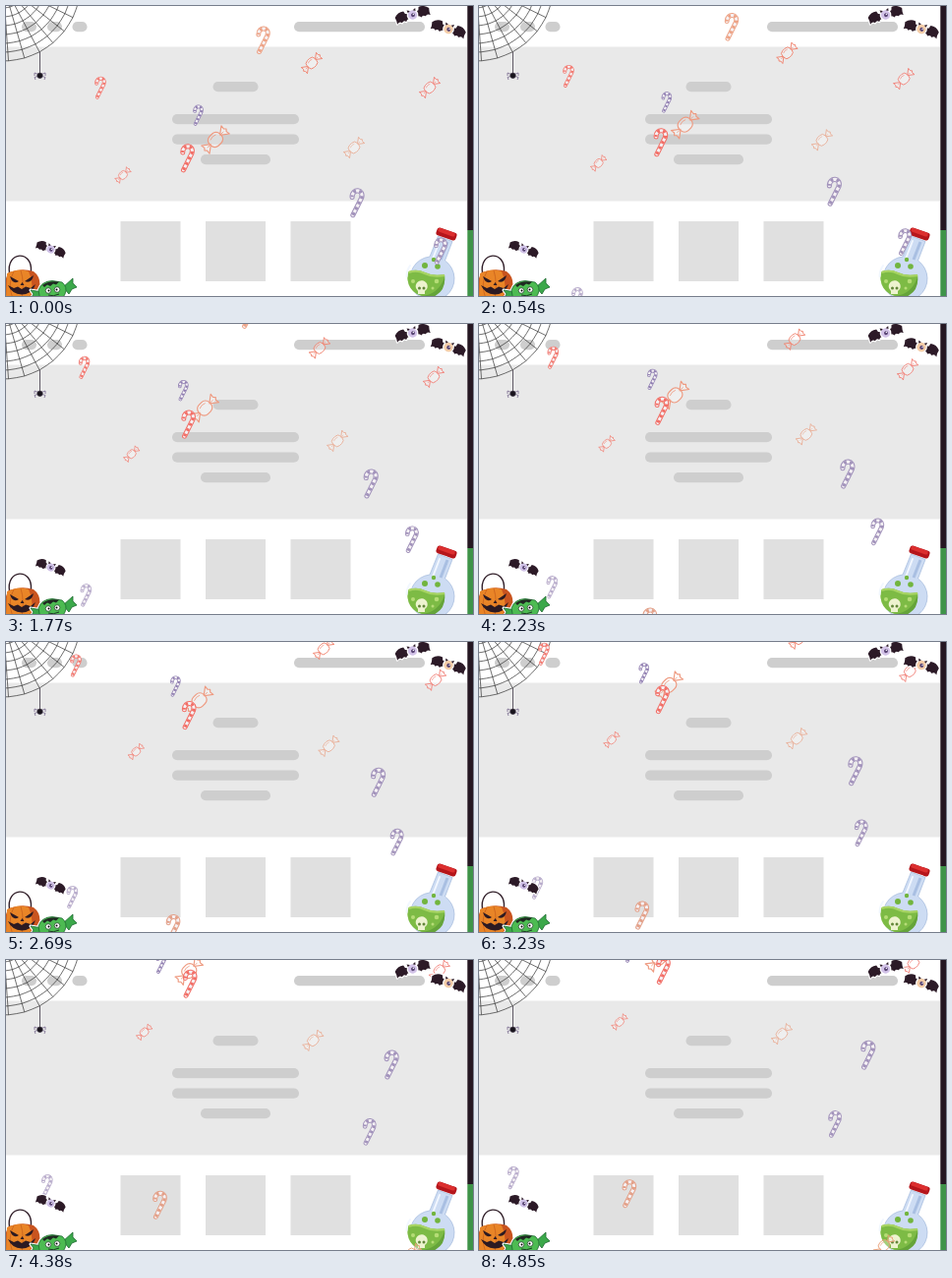
These frames come from a looping animation (475 by 295 pixels, 4920 ms). An HTML page:

```html
<!DOCTYPE html>
<html lang="en">
<head>
<meta charset="utf-8">
<title>Halloween page</title>
<style>
  html, body { margin: 0; width: 100%; height: 100%; overflow: hidden; background: #fff; }
  svg { display: block; width: 475px; height: 295px; }
</style>
</head>
<body>
<svg viewBox="0 0 475 295">
  <defs>
    <path id="hook" d="M-4 12.3L4.4-4.5C7.5-13.5-5-14.5-4.8-5.5" fill="none"/>
    <g id="cane" stroke-linecap="round">
      <use href="#hook" stroke="currentColor" stroke-width="5"/>
      <use href="#hook" stroke="#f5f1f4" stroke-width="3"/>
      <use href="#hook" stroke="currentColor" stroke-width="3.2" stroke-dasharray="2.8 3.2" stroke-linecap="butt"/>
    </g>
    <g id="candy" transform="rotate(-45)" fill="#fff" fill-opacity=".3" stroke="currentColor" stroke-width=".9" stroke-linejoin="round">
      <path d="M5 0L11-4.5L10.6-1.5L12 0L10.6 1.5L11 4.5ZM-5 0L-11-4.5L-10.6-1.5L-12 0L-10.6 1.5L-11 4.5Z"/>
      <rect x="-5.7" y="-5" width="11.4" height="10" rx="4.2"/>
      <path d="M-3-2.500Q0-4 3-2.500M6 0H9M-6 0H-9" fill="none" stroke-width=".6"/>
    </g>
    <path id="wing" d="M3-1Q5-3 7-3L8-6Q14-7 18-2Q17 1 17.500 5Q14.500 2.500 12.500 5Q10 2.500 8 5Q6 2 3 3Z"/>
    <g id="bat">
      <g fill="#2c1a27" stroke="#fff" stroke-width="2.400" paint-order="stroke" stroke-linejoin="round">
        <use href="#wing"/>
        <use href="#wing" transform="scale(-1 1)"/>
        <circle r="4.700" fill="currentColor"/>
      </g>
      <path d="M-4-3L-4.500-6L-1.500-4.500M4-3L4.500-6L1.500-4.500" fill="#2c1a27"/>
      <circle r="2" cx=".4" cy=".3" fill="#5a4675"/>
      <circle r=".7" cx="1" cy="-.4" fill="#fff"/>
    </g>
  </defs>

  <path d="M0 41.400H469V198.600H0Z" fill="#e9e9e9"/>
  <g id="pills" fill="#cecece"></g>
  <path d="M116.500 219h61v61h-61zM203 219h61v61h-61zM289.500 219h61v61h-61z" fill="#e0e0e0"/>
  <path d="M469.300 0h5.700v228h-5.700z" fill="#251722"/>
  <path d="M469.300 228h5.700v67h-5.700z" fill="#3f9449"/>

  <path id="web" fill="none" stroke="#333" stroke-width=".7"/>
  <g stroke="#3b3442" stroke-width=".8" fill="none">
    <path d="M34.500 47V68"/>
    <path d="M34 70L29 68V71M34 71L29 72.500L30 75M35 70L40 68V71M35 71L40 72.500L39 75" stroke="#77698d"/>
    <circle cx="34.500" cy="70.800" r="2.700" fill="#17131b"/>
  </g>

  <g id="flask">
    <path d="M439.500 234L454 239.500L446.500 259A22.500 22.500 0 1 1 431 255Z" fill="#cddcf3" stroke="#a9bedf" stroke-width=".8"/>
    <path d="M409.500 270Q418 267 426 271T446 273A19 19 0 1 1 409.500 270Z" fill="#7dbb45"/>
    <path d="M446 276A19 19 0 0 1 418 295Q439 296 446 276Z" fill="#65a43a"/>
    <path d="M409.500 271Q418 268 426 272T446 274" fill="none" stroke="#a9d565" stroke-width="2"/>
    <path d="M441 239L434.500 256M411 264Q407.500 269 407.500 275" fill="none" stroke="#f2f7ff" stroke-width="2" stroke-linecap="round"/>
    <path d="M449 240L442 258" stroke="#a9bfe2" stroke-width="3"/>
    <g transform="translate(448 232) rotate(19)">
      <rect x="-10.500" y="-4" width="21" height="8" rx="2.500" fill="#b5151b"/>
      <rect x="-9.500" y="-3.700" width="18" height="4" rx="2" fill="#dc2f2f"/>
    </g>
    <g fill="#72b53e">
      <circle cx="426" cy="264" r="3"/><circle cx="435" cy="258" r="2.200"/><circle cx="439" cy="265" r="2.800"/>
    </g>
    <g fill="#b5dc76">
      <circle cx="414" cy="280" r="2"/><circle cx="438" cy="280" r="2.300"/><circle cx="434" cy="287" r="1.500"/>
    </g>
    <path d="M417 287A6 6 0 1 1 428 288L426 290V293H419V290Z" fill="#edf3cf"/>
    <g fill="#63863a"><circle cx="420.500" cy="287" r="1.500"/><circle cx="425" cy="287" r="1.500"/></g>
  </g>

  <g id="sweets"></g>

  <use href="#bat" transform="translate(413.500 9) rotate(-16)" color="#d3c3e8"/>
  <use href="#bat" transform="translate(450 23.500) rotate(17)" color="#f4cda8"/>
  <use href="#bat" transform="translate(45.500 247.500) rotate(20) scale(.86)" color="#cfc1e6"/>

  <g id="pumpkin">
    <path d="M3.500 272C0 249 27 248 25.500 270" fill="none" stroke="#33212b" stroke-width="1.400"/>
    <path d="M3 271Q16 266 28 270Q36 276 34 287Q32 295 27 299H2Q-5 283 3 271Z" fill="#c9541f"/>
    <path d="M1 272Q14 266 23 270Q30 284 23 299H0Z" fill="#e98527"/>
    <path d="M8 270Q1 282 7 298M15 269Q19 282 16 298" fill="none" stroke="#cf681f"/>
    <path d="M4 275L13 280Q7 284 4 275ZM28 274L19 280Q26 283 28 274ZM16.500 281L14.500 284H18.500ZM2 284L8 287L12 285.500L16 288L20 285.500L25 287L30 283Q27 293 16 293.500Q6 293 2 284Z" fill="#2c1a22"/>
  </g>

  <g id="monster" stroke-linejoin="round">
    <path d="M58 286L68 277L68 282L72 286L67 288L64 293ZM37 291L25 289L28 293L25 298H36ZM33 289Q36 280 47 279.500L57 281Q63 286 60 293L56 300H35Z" fill="#fff" stroke="#fff" stroke-width="3"/>
    <path d="M58 286L68 277L68 282L72 286L67 288L64 293ZM37 291L25 289L28 293L25 298H36Z" fill="#3ba84a" stroke="#1d6a30" stroke-width=".8"/>
    <path d="M33 289Q36 280 47 279.500L57 281Q63 286 60 293L56 300H35Z" fill="#4dbb52" stroke="#1d6a30" stroke-width=".8"/>
    <path d="M37 284Q43 279 54 280.500L51 283.500L48 282.500L45 285L42 283.500L39 286Z" fill="#1f2822"/>
    <g fill="#fff" stroke="#1d3a24" stroke-width=".7">
      <circle cx="43" cy="289.500" r="2.800"/><circle cx="52" cy="288.500" r="2.800"/>
    </g>
    <circle cx="43.500" cy="289.500" r="1"/><circle cx="51.500" cy="288.500" r="1"/>
    <path d="M43 294Q48 296 54 293" fill="none" stroke="#1d3a24"/>
  </g>
</svg>
<script>
const LOOP = 4920, STEP = LOOP / 64;
const byId = id => document.getElementById(id);

function add(parent, tag, attrs) {
  const el = document.createElementNS('http://www.w3.org/2000/svg', tag);
  for (const name in attrs) el.setAttribute(name, attrs[name]);
  return parent.appendChild(el);
}

// x, y, width
[[16, 16, 15], [42, 16, 15], [67.5, 16, 15], [293, 16, 133],
 [210.5, 77, 46], [169, 110, 129], [169, 130.5, 129], [198, 151, 71]]
  .forEach(([x, y, width]) => add(byId('pills'), 'rect', { x, y, width, height: 10.3, rx: 5.1 }));

// The web's centre lies above the page, so only its lower right part shows.
function webPoint(radius, degrees) {
  const a = degrees * Math.PI / 180;
  return `${-3 + radius * Math.cos(a)} ${-23 + radius * Math.sin(a)}`;
}
let web = '';
for (let angle = 2; angle < 100; angle += 12) {
  web += `M${webPoint(0, 0)}L${webPoint(79, angle)}`;
  for (let radius = 25; radius <= 79; radius += 9)
    web += `M${webPoint(radius, angle)}Q${webPoint(radius, angle + 6)} ${webPoint(radius, angle + 12)}`;
}
byId('web').setAttribute('d', web);

// shape, colour, scale, start x and y, speed x and y in px per second
const sweets = [
  ['candy', '#ee9a80', 1.3, 213, 136, -6.1, -28.5],
  ['cane', '#f27970', .79, 96, 83, -9.3, -22],
  ['cane', '#eda386', .98, 261.5, 34.5, -8.5, -25],
  ['candy', '#f0826e', .98, 311, 58, 4.5, -19],
  ['candy', '#f2827a', .98, 431, 83, 2.25, -16.5],
  ['cane', '#9180b2', .73, 195.5, 111, -8.6, -24.6],
  ['cane', '#f26f67', 1, 184.5, 154.5, .6, -29.8],
  ['candy', '#e9b09a', .98, 354, 144, -9.5, -14.2],
  ['candy', '#f27a6e', .76, 119, 172, 4.95, -22.5],
  ['cane', '#a293bb', 1.03, 357, 200, 8, -21.4],
  ['cane', '#a293bb', .95, 442, 249, -16.5, -17],
  ['cane', '#b7abcb', .8, 108, 307, -15.1, -17.7],
  ['cane', '#e3a088', 1, 191.5, 358.5, -8, -25],
  ['candy', '#e99d74', .98, 412, 380, 0, -18.5],
].map(([shape, color, scale, x, y, vx, vy]) => {
  const el = add(byId('sweets'), 'use', { href: '#' + shape, color });
  return s => el.setAttribute('transform', `translate(${x + vx * s} ${y + vy * s}) scale(${scale})`);
});

function draw(now) {
  const seconds = Math.floor((now % LOOP + 4) / STEP) % 64 * STEP / 1000;
  sweets.forEach(place => place(seconds));
  requestAnimationFrame(draw);
}
draw(0);
</script>
</body>
</html>
```
